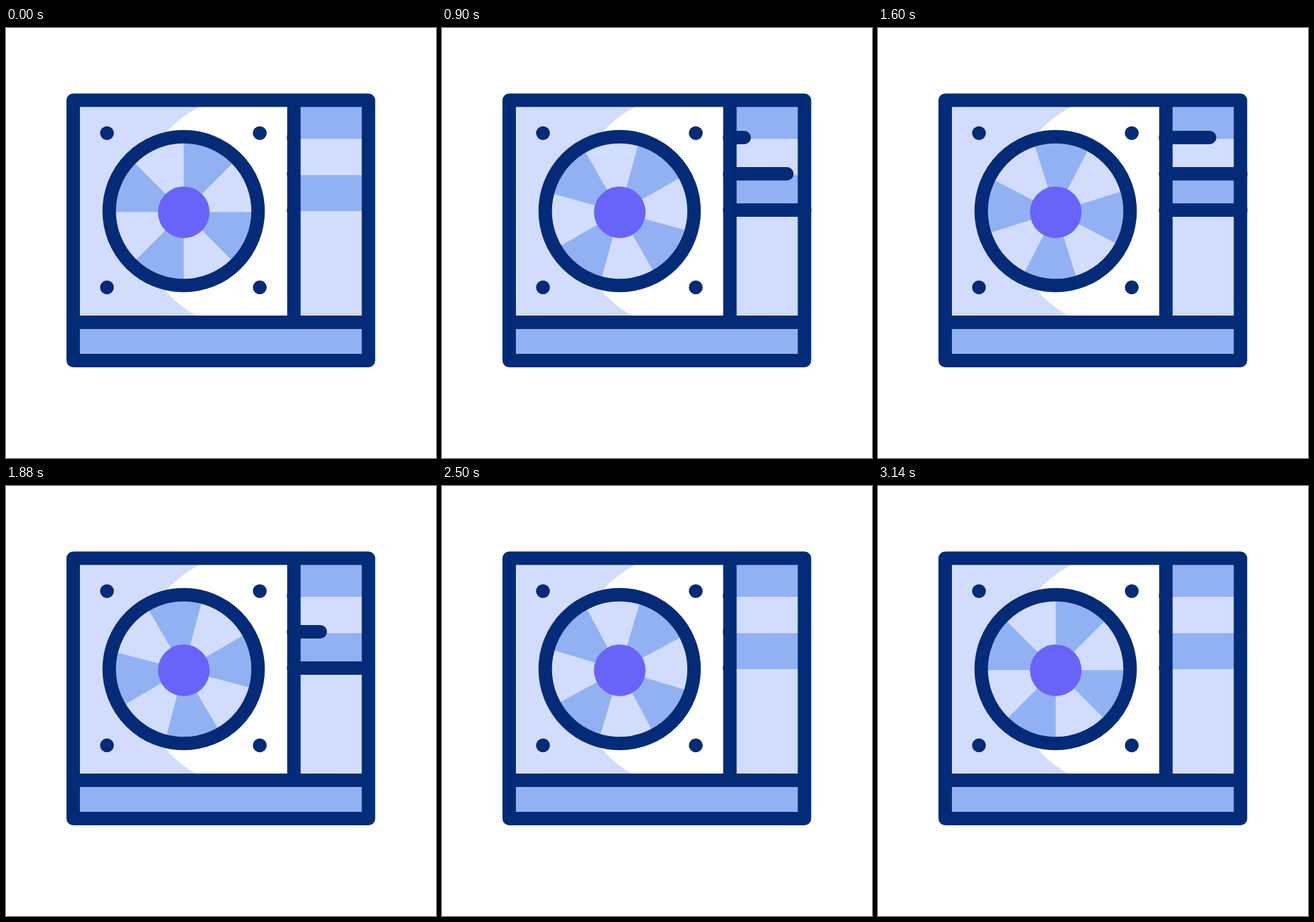
Animation of 640x640 px, one loop 3600 ms. Source, as an HTML page:

```html
<!DOCTYPE html>
<html lang="en">
<head>
<meta charset="utf-8">
<title>Fan unit</title>
<style>
  html, body { margin: 0; width: 100%; height: 100%; overflow: hidden; background: #fff; }
  svg { display: block; width: 100%; height: 100%; }
  .light { fill: #d2dcfd; }
  .mid { fill: #92b1f3; }
  .dark { fill: #032b77; }
  .line { fill: none; stroke: #032b77; stroke-width: 20; stroke-linecap: round; stroke-linejoin: round; }
</style>
</head>
<body>
<svg viewBox="0 0 640 640">
  <clipPath id="panel"><rect x="100" y="108" width="328" height="330"/></clipPath>

  <rect class="light" x="100" y="108" width="439" height="330"/>
  <circle cx="370" cy="274" r="177" fill="#fff" clip-path="url(#panel)"/>
  <rect class="mid" x="428" y="108" width="111" height="57"/>
  <rect class="mid" x="428" y="219" width="111" height="53.5"/>
  <rect class="mid" x="100" y="438" width="439" height="57"/>

  <g id="bars" class="line"></g>

  <path class="line" d="M100 107.5H539.5V495H100ZM100 438H539.5M428.5 107.5V438"/>

  <g class="dark">
    <circle cx="150.3" cy="156.5" r="10.3"/>
    <circle cx="377.7" cy="156.5" r="10.3"/>
    <circle cx="150.3" cy="386" r="10.3"/>
    <circle cx="377.7" cy="386" r="10.3"/>
  </g>

  <circle class="light" cx="264.4" cy="272.5" r="111"/>
  <circle id="blades" cx="264.5" cy="274" r="52.5" fill="none" stroke="#92b1f3"
          stroke-width="105" pathLength="8" stroke-dasharray="1"/>
  <circle class="line" cx="264.4" cy="272.5" r="110.8"/>
  <circle cx="264.6" cy="274.3" r="38.4" fill="#6864f9"/>
</svg>
<script>
const LOOP = 3600;
const BAR_TIME = 400, BAR_START = 428, BAR_LENGTH = 112;

// Top to bottom: the lowest bar enters first, the highest leaves first.
const bars = [
  { y: 163, enter: 788, leave: 1424 },
  { y: 217, enter: 628, leave: 1642 },
  { y: 271, enter: 468, leave: 1860 }
];

// Fan spin: time in ms, angle in degrees, speed in degrees per ms.
const spin = [
  [500, 0, 0],
  [1120, 190.3, 0.333],
  [1600, 342.2, 0.288],
  [2140, 483.5, 0.229],
  [2500, 556.5, 0.18],
  [3140, 630, 0]
];

const blades = document.getElementById('blades');
const group = document.getElementById('bars');

for (const bar of bars) {
  bar.path = document.createElementNS('http://www.w3.org/2000/svg', 'path');
  group.append(bar.path);
}

function ease(u) {
  u = Math.min(1, Math.max(0, u));
  return u * u * (3 - 2 * u);
}

function fanAngle(t) {
  if (t <= spin[0][0]) return 0;
  const i = spin.findIndex(key => t < key[0]);
  if (i < 0) return spin[spin.length - 1][1];
  const [t0, a0, v0] = spin[i - 1], [t1, a1, v1] = spin[i];
  const d = t1 - t0, u = (t - t0) / d;
  return a0 + (a1 - a0) * ease(u)
    + d * u * (1 - u) * (v0 * (1 - u) - v1 * u);
}

function draw(t) {
  for (const { y, enter, leave, path } of bars) {
    const shown = ease((t - enter) / BAR_TIME) - ease((t - leave) / BAR_TIME);
    path.setAttribute('d', `M${BAR_START} ${y}H${BAR_START + BAR_LENGTH * shown}`);
  }
  blades.setAttribute('transform', `rotate(${fanAngle(t)} 264.5 274)`);
}

const start = performance.now();
function tick() {
  draw((performance.now() - start) % LOOP);
  requestAnimationFrame(tick);
}
tick();
</script>
</body>
</html>
```
